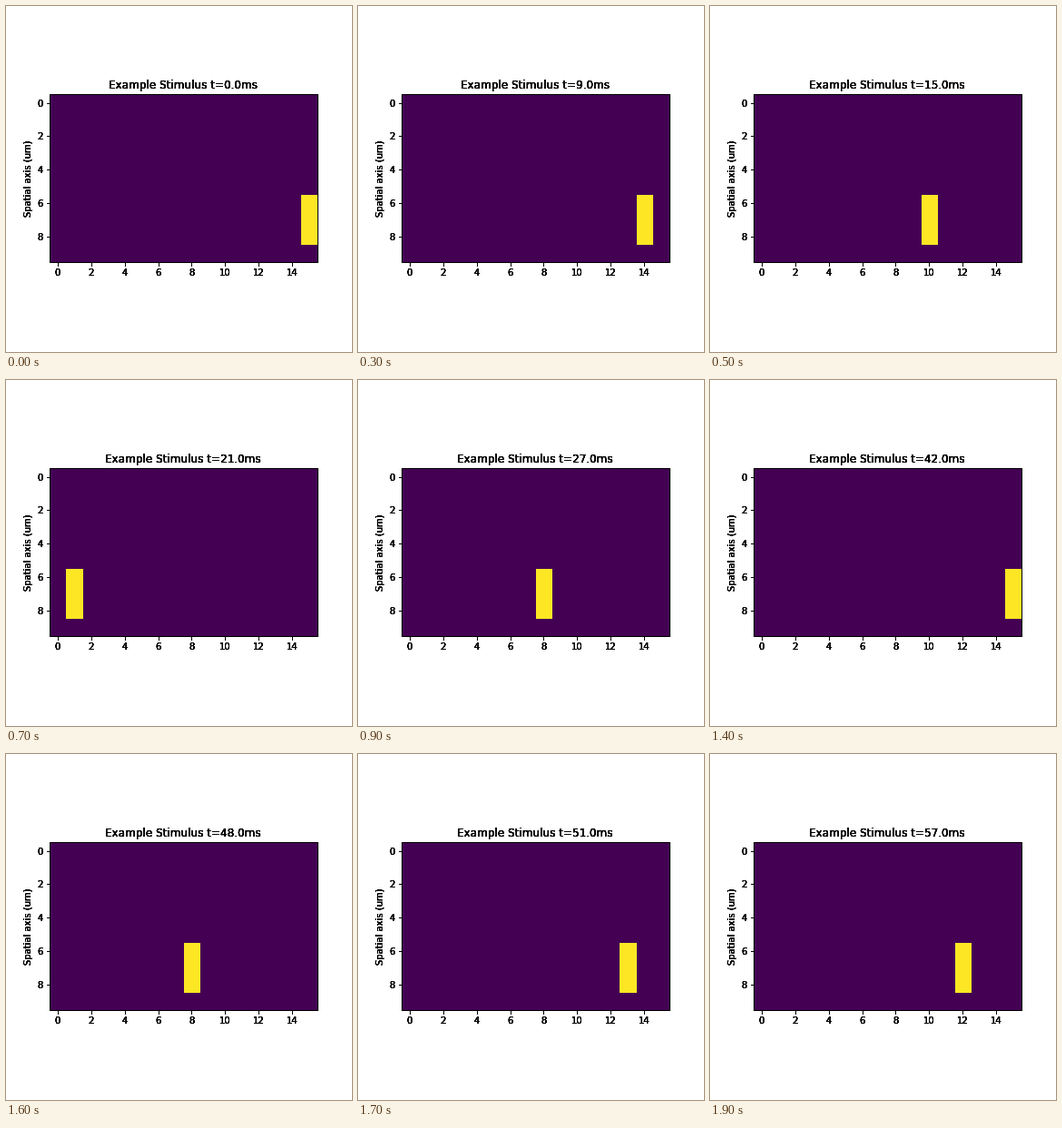
Animation, 381 px wide and 381 px high, one loop 2000 ms. Source, as a matplotlib script:

```python
import numpy as np
import matplotlib.pyplot as plt
from matplotlib.animation import FuncAnimation

SIZE, DPI = 381, 72
FRAMES, INTERVAL = 20, 100
ROWS, COLS = 10, 16
STEP_MS = 3.0
FREQ = 0.12           # cycles per ms
CENTER, SWING = 8, 6.9
LAYERS = 6            # stacked axes give the crisp, heavy ink

plt.rcParams.update({
    "font.family": "DejaVu Sans",
    "font.size": 10,
    "axes.titlesize": 12,
    "figure.subplot.bottom": 0.125,
})


def stimulus(t):
    """Bar that oscillates sideways, snapped to the grid."""
    grid = np.zeros((ROWS, COLS))
    col = int(round(CENTER + SWING * np.cos(2 * np.pi * FREQ * t)))
    grid[6:9, col] = 1
    return grid


def add_layer(fig):
    ax = fig.add_subplot(111, label=f"layer{len(fig.axes)}")
    ax.patch.set_visible(False)
    ax.set(xlim=(-0.5, COLS - 0.5), ylim=(ROWS - 0.5, -0.5), aspect="equal",
           xticks=range(0, COLS, 2), yticks=range(0, ROWS, 2),
           ylabel="Spatial axis (um)")
    return ax


fig = plt.figure(figsize=(SIZE / DPI, SIZE / DPI), dpi=DPI, facecolor="white")
layers = [add_layer(fig) for _ in range(LAYERS)]
image = layers[0].imshow(stimulus(0), cmap="viridis", vmin=0, vmax=1,
                         interpolation="nearest")


def update(i):
    t = i * STEP_MS
    image.set_data(stimulus(t))
    for ax in layers:
        ax.set_title(f"Example Stimulus t={t:.1f}ms")
    return [image]


anim = FuncAnimation(fig, update, frames=FRAMES, interval=INTERVAL,
                     init_func=lambda: update(0), repeat=True, repeat_delay=0)
plt.show()
```
